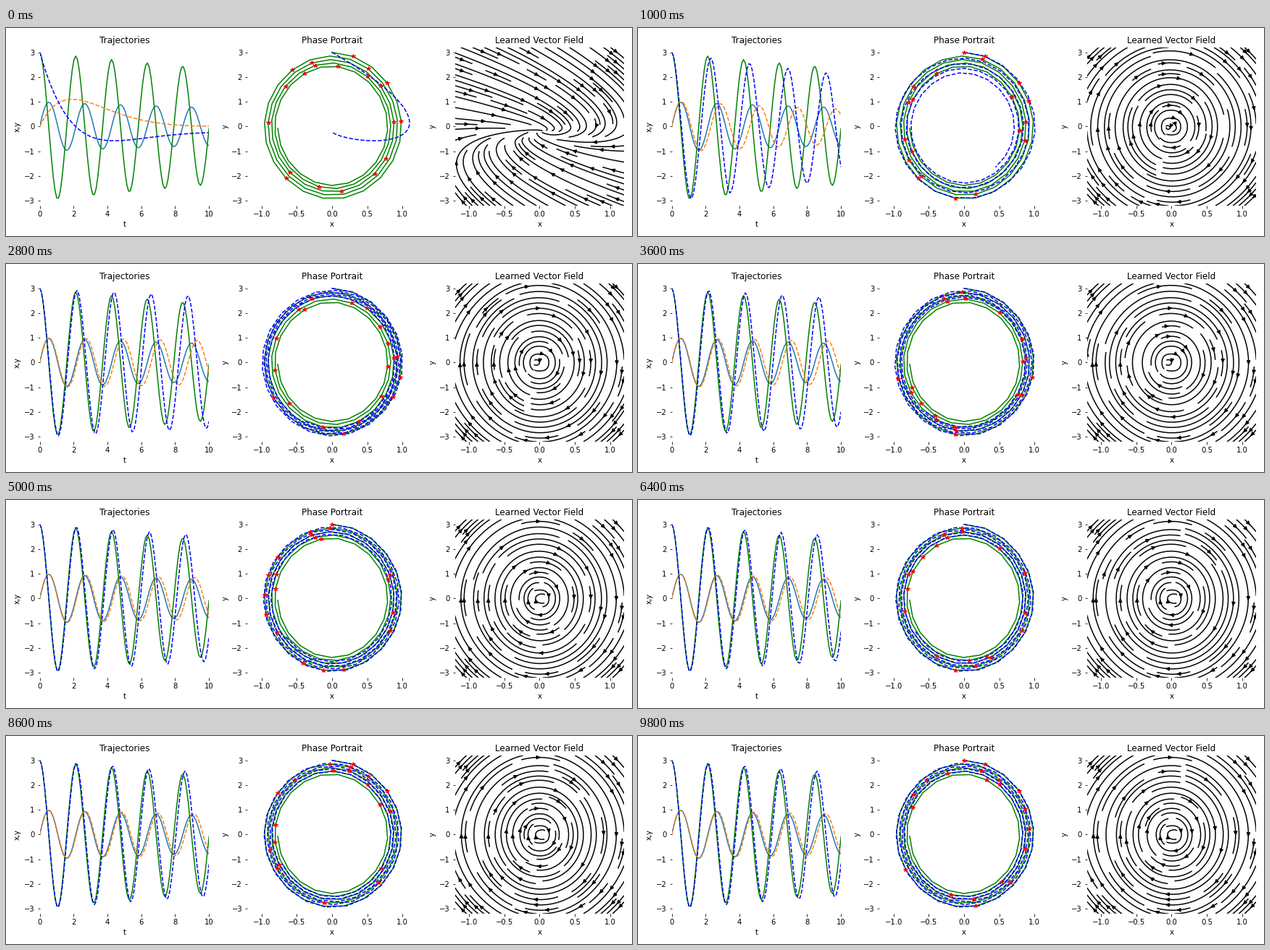
A matplotlib script that plays this animation: 864x288 px, repeating every 10 s.

```python
import numpy as np
import matplotlib.pyplot as plt
from matplotlib.animation import FuncAnimation

FRAMES = 50
XMAX, YMAX = 1.2, 3.2
START = (0.0, 3.0)
T = np.linspace(0, 10, 100)


def pendulum(speed, pull, drag, center=0.0):
    def field(x, y):
        return speed * y, -pull * np.sin(x - center) - drag * y
    return field


def untrained(x, y):
    """Spiral sink that is steeper on its left side."""
    u, v = x - 0.03, y + 0.22
    left = np.minimum(u, 0)
    return (-0.158 * u + 0.45 * v - 0.32 * left,
            -0.462 * u - 0.742 * v + 0.31 * left)


def learned(n):
    """Quick switch to an oscillator, then slow approach to the true one."""
    rest = max(0.0, 1 - n / 8) ** 3
    error = np.exp(-max(n - 10, 0) / 9)
    fitted = pendulum(0.985 - 0.006 * error, 9.71 - 0.43 * error,
                      0.038 - 0.021 * error, 1.5e-4 * (n - 21))

    def field(x, y):
        a, b = untrained(x, y), fitted(x, y)
        return tuple(rest * p + (1 - rest) * q for p, q in zip(a, b))
    return field


def solve(field, sub=2):
    """Runge-Kutta path through START, sampled at T."""
    h = (T[1] - T[0]) / sub
    x, y = START
    path = [(x, y)]
    for _ in T[1:]:
        for _ in range(sub):
            a, b = field(x, y)
            c, d = field(x + h / 2 * a, y + h / 2 * b)
            e, f = field(x + h / 2 * c, y + h / 2 * d)
            g, k = field(x + h * e, y + h * f)
            x += h / 6 * (a + 2 * c + 2 * e + g)
            y += h / 6 * (b + 2 * d + 2 * f + k)
        path.append((x, y))
    return np.array(path).T


def batch(n):
    """Training points drawn for step n."""
    return np.random.default_rng(n).choice(90, 20, replace=False)


def dress(ax, title, xlabel, ylabel, xlim):
    ax.set_title(title)
    ax.set_xlabel(xlabel)
    ax.set_ylabel(ylabel)
    ax.set_xlim(*xlim)
    ax.set_ylim(-YMAX, YMAX)
    ax.spines[:].set_visible(False)


fig, (traj, phase, flow) = plt.subplots(1, 3, figsize=(12, 4), dpi=72, facecolor="white")
dress(traj, "Trajectories", "t", "x,y", (0, 10))
dress(phase, "Phase Portrait", "x", "y", (-XMAX, XMAX))
dress(flow, "Learned Vector Field", "x", "y", (-XMAX, XMAX))
fig.tight_layout()

true_x, true_y = solve(pendulum(1.0, 9.81, 0.05))
traj.plot(T, true_x, color="C0")
traj.plot(T, true_y, "g-")
fit_x, = traj.plot([], [], "--", color="C1")
fit_y, = traj.plot([], [], "b--")
phase.plot(true_x, true_y, "g-")
fit_path, = phase.plot([], [], "b--")
stars, = phase.plot([], [], "r*")

gx, gy = np.meshgrid(np.linspace(-XMAX, XMAX, 21), np.linspace(-YMAX, YMAX, 21))


def draw(n):
    field = learned(n)
    x, y = solve(field)
    fit_x.set_data(T, x)
    fit_y.set_data(T, y)
    fit_path.set_data(x, y)
    picks = batch(n)
    stars.set_data(true_x[picks], true_y[picks])

    for old in list(flow.collections) + list(flow.patches):
        old.remove()
    u, v = field(gx, gy)
    size = np.hypot(u, v) + 1e-9
    flow.streamplot(gx, gy, u / size, v / size, color="black")
    flow.set_xlim(-XMAX, XMAX)
    flow.set_ylim(-YMAX, YMAX)
    return []


anim = FuncAnimation(fig, draw, frames=FRAMES, interval=200, init_func=lambda: [],
                     repeat=True, repeat_delay=0, blit=False)
plt.show()
```
